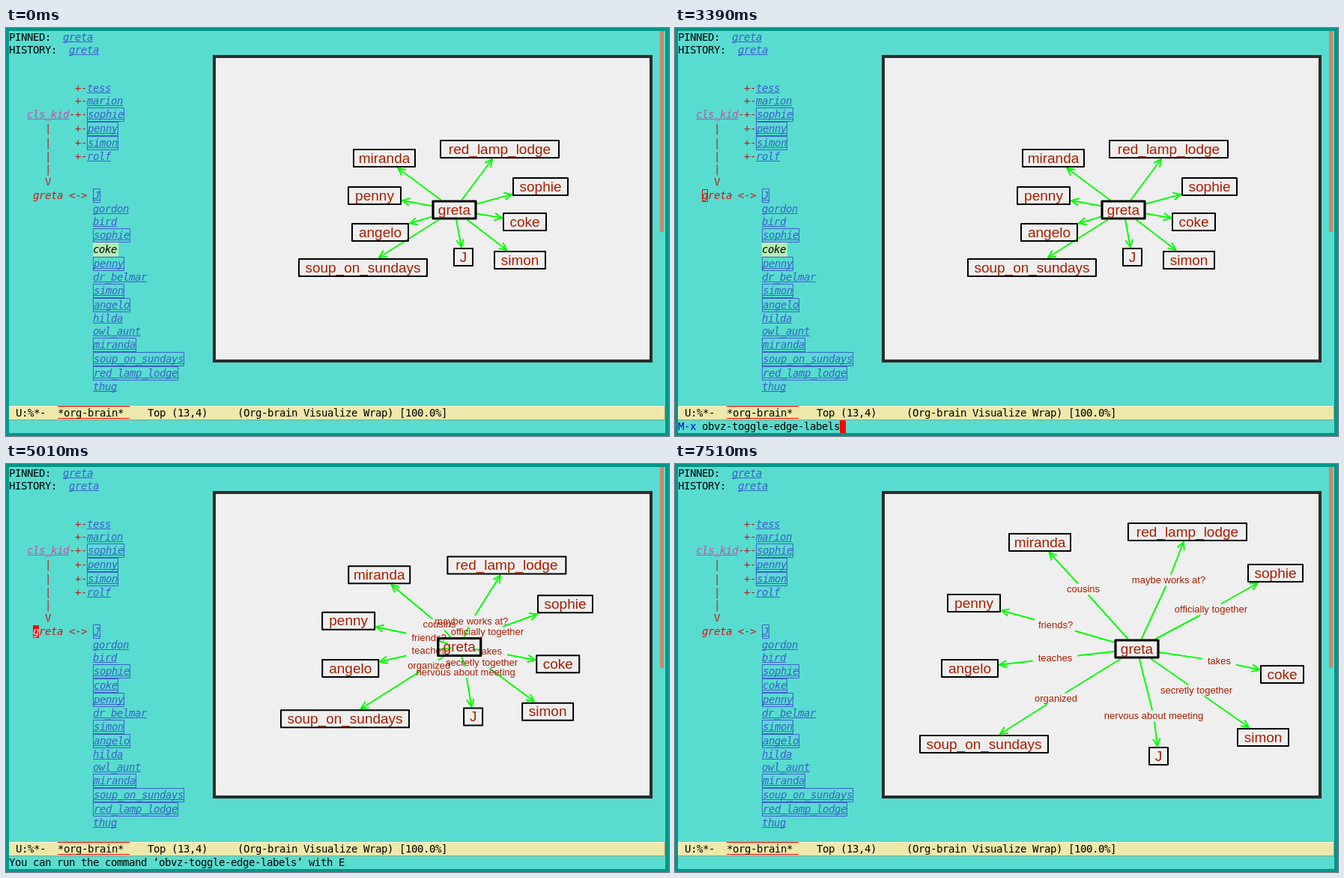
Write an HTML page with a canvas that moves like this. It is 885x544 px and loops after 7870 ms.

```html
<!DOCTYPE html>
<html lang="en">
<head>
<meta charset="utf-8">
<title>Graph edge labels</title>
<style>
  html, body { margin: 0; width: 100%; height: 100%; overflow: hidden; background: #58dccf; }
  canvas { display: block; }
</style>
</head>
<body>
<canvas id="stage" width="885" height="544"></canvas>
<script>
const ctx = document.getElementById('stage').getContext('2d');

const LOOP = 7870;
const CELL = 8, ROW = 17, ASCENT = 13;
const MONO = '14px "DejaVu Sans Mono", monospace';
const SANS = '"Liberation Sans", Arial, sans-serif';
const BG = '#58dccf', FRAME = '#009688', LINK = '#3a5fcd', TREE = '#b22222';
const RED = '#dd1010', CURSOR = '#ff0000', NODE = '#a61e00', EDGE = '#00ff00';

const COMMAND = 'obvz-toggle-edge-labels';
const MESSAGE = 'You can run the command ‘' + COMMAND + '’ with E';
const KEYS = [960, 1110, 1290, 1380, 1640, 1880, 1970, 2110, 2250, 2480, 2610, 2800, 2940, 3130];
const PROMPT = 400, COMPLETE = 3390, ENTER = 4750, RUN = 4920, CLEAR = 7000;
const STEPS = [4920, 4970, 5010, 5070, 5120, 5170];

// Sidebar entries; a leading # marks a boxed link.
const SIBLINGS = ['tess', 'marion', '#sophie', '#penny', '#simon', 'rolf'];
const CHILDREN = ['gordon', 'bird', '#sophie', '#coke', '#penny', 'dr_belmar', '#simon', '#angelo',
  'hilda', 'owl_aunt', '#miranda', '#soup_on_sundays', '#red_lamp_lodge', 'thug'];

const HUB = { name: 'greta', w: 57, from: [598.5, 242.5], to: [616.5, 246.5] };
const NODES = [
  { name: 'miranda', w: 82, from: [505, 173.5], to: [487, 104.5], label: 'cousins', at: [545, 167] },
  { name: 'red_lamp_lodge', w: 158, from: [659, 161.5], to: [684, 90.5], label: 'maybe works at?', at: [659, 155] },
  { name: 'sophie', w: 73, from: [713.5, 211.5], to: [801.5, 145.5], label: 'officially together', at: [715.5, 194] },
  { name: 'penny', w: 70, from: [492, 223.5], to: [399, 185.5], label: 'friends?', at: [508, 215] },
  { name: 'coke', w: 57, from: [692.5, 258.5], to: [810.5, 280.5], label: 'takes', at: [726.5, 263] },
  { name: 'angelo', w: 75, from: [499.5, 272.5], to: [393.5, 272.5], label: 'teaches', at: [507.5, 259] },
  { name: 'simon', w: 68, from: [686, 309.5], to: [785, 364.5], label: 'secretly together', at: [696, 302] },
  { name: 'J', w: 25, from: [610.5, 305.5], to: [645.5, 389.5], label: 'nervous about meeting', at: [639, 336] },
  { name: 'soup_on_sundays', w: 171, from: [476.5, 319.5], to: [412.5, 373.5], label: 'organized', at: [508.5, 313] }
];

function rect(x, y, w, h, color) {
  ctx.fillStyle = color;
  ctx.fillRect(x, y, w, h);
}

function outline(x, y, w, h, color) {
  ctx.strokeStyle = color;
  ctx.lineWidth = 1;
  ctx.strokeRect(x + 0.5, y + 0.5, w - 1, h - 1);
}

// Terminal text: one glyph per cell.
function cells(text, x, base, color, italic) {
  ctx.font = (italic ? 'italic ' : '') + MONO;
  ctx.textAlign = 'left';
  ctx.fillStyle = color;
  [...text].forEach((ch, i) => ctx.fillText(ch, x + i * CELL, base));
}

function link(text, x, base, color = LINK) {
  cells(text, x, base, color, true);
  rect(x, base + 1, text.length * CELL, 1, color);
}

// Draws one entry and returns the height of its line.
function entry(item, x, y, hover) {
  const boxed = item[0] === '#';
  const name = boxed ? item.slice(1) : item;
  if (!boxed) {
    link(name, x, y + ASCENT);
    return ROW;
  }
  const w = name.length * CELL + 2;
  if (hover) {
    rect(x, y, w, ROW + 2, '#b4eeb4');
    cells(name, x, y + 1 + ASCENT, '#000', true);
  } else {
    link(name, x + 1, y + 1 + ASCENT);
    outline(x, y, w, ROW + 2, LINK);
  }
  return ROW + 2;
}

function sidebar(t) {
  cells('PINNED:', 4, 17, '#000');
  link(HUB.name, 76, 17);
  cells('HISTORY:', 4, 34, '#000');
  link(HUB.name, 84, 34);

  let y = 72;
  SIBLINGS.forEach((item, i) => {
    const base = y + ASCENT + (item[0] === '#' ? 1 : 0);
    cells('+-', 92, base, TREE);
    if (i === 2) {
      link('cls_kid', 28, base, '#c050a8');
      cells('-', 84, base, TREE);
    }
    if (i > 2) cells('|', 52, base, TREE);
    y += entry(item, 108, y);
  });
  cells('|', 52, y + ASCENT, TREE);
  cells('V', 52, y + ROW + ASCENT, TREE);
  y += 2 * ROW;

  const base = y + 1 + ASCENT;
  const solid = (t >= 210 && t < PROMPT) || (t >= RUN && t < 7510);
  cells(HUB.name, 36, base, RED, true);
  if (solid) {
    rect(36, y + 1, CELL, ROW, CURSOR);
    cells(HUB.name[0], 36, base, '#f4ffff', true);
  } else if (t >= PROMPT && t < RUN) {
    outline(36, y + 1, CELL, ROW, CURSOR);
  }
  cells('<->', 84, base, TREE);
  y += entry('#J', 116, y);
  for (const item of CHILDREN) y += entry(item, 116, y, item === '#coke' && t < RUN);
}

function modeLine() {
  rect(4, 504, 876, 19, '#eee8aa');
  rect(4, 504, 876, 1, '#fffbd0');
  rect(4, 504, 1, 19, '#fffbd0');
  rect(4, 522, 876, 1, '#a19d73');
  rect(879, 504, 1, 19, '#a19d73');
  rect(69, 504, 96, 1, CURSOR);
  rect(69, 520, 96, 1, CURSOR);
  cells('U:%*-  *org-brain*    Top (13,4)     (Org-brain Visualize Wrap) [100.0%]', 13, 518, '#000');
}

function echoArea(t) {
  const base = 536;
  if (t >= RUN && t < CLEAR) cells(MESSAGE, 4, base, '#000');
  if (t < PROMPT || t >= RUN) return;
  const count = t >= COMPLETE ? COMMAND.length : KEYS.filter(k => t >= k).length;
  cells('M-x', 4, base, '#0000cd');
  cells(COMMAND.slice(0, count), 36, base, '#000');
  if (t >= ENTER) {
    rect(4, 523, CELL, ROW, CURSOR);
    cells('M', 4, base, BG);
  } else if (!(t >= 900 && t < 960) && !(t >= 3900 && t < 4390)) {
    rect(36 + count * CELL, 523, CELL, ROW, CURSOR);
  }
}

const mix = (a, b, p) => [a[0] + (b[0] - a[0]) * p, a[1] + (b[1] - a[1]) * p];

// Point where the ray from a box centre towards a target leaves the box.
function border(c, w, h, target) {
  const dx = target[0] - c[0], dy = target[1] - c[1];
  if (!dx && !dy) return c;
  const k = Math.min(w / 2 / Math.abs(dx), h / 2 / Math.abs(dy));
  return [c[0] + dx * k, c[1] + dy * k];
}

function line(points) {
  ctx.beginPath();
  points.forEach(p => ctx.lineTo(p[0], p[1]));
  ctx.stroke();
}

function arrow(a, b) {
  const angle = Math.atan2(b[1] - a[1], b[0] - a[0]);
  const barb = s => [b[0] - 11 * Math.cos(angle + s), b[1] - 11 * Math.sin(angle + s)];
  line([a, b]);
  line([barb(0.46), b, barb(-0.46)]);
}

function edge(node, hub, pos, p) {
  ctx.strokeStyle = EDGE;
  ctx.lineWidth = 2;
  const hubEnd = target => border(hub, HUB.w + 3, 26, target);
  const nodeEnd = target => border(pos, node.w + 4, 27, target);
  if (!p) {
    arrow(hubEnd(pos), nodeEnd(hub));
    return;
  }
  const mid = mix(HUB.from, node.at, p);
  ctx.font = '13px ' + SANS;
  const w = ctx.measureText(node.label).width + 14;
  line([hubEnd(mid), border(mid, w, 15, hub)]);
  arrow(border(mid, w, 15, pos), nodeEnd(mid));
}

function caption(text, [x, y], size, drop) {
  ctx.font = size + 'px ' + SANS;
  ctx.textAlign = 'center';
  ctx.fillStyle = NODE;
  ctx.fillText(text, x, y + drop);
}

function box(node, pos, weight) {
  ctx.strokeStyle = '#000';
  ctx.lineWidth = weight;
  ctx.strokeRect(pos[0] - node.w / 2, pos[1] - 11.5, node.w, 23);
  caption(node.name, pos, 19, 6);
}

function graph(t) {
  rect(276, 36, 587, 410, '#2b2b2b');
  rect(280, 40, 579, 402, '#efefef');
  const step = STEPS.filter(s => t >= s).pop();
  const p = step ? (step - 4914) / 256 : 0;
  const hub = mix(HUB.from, HUB.to, p);
  const places = NODES.map(n => mix(n.from, n.to, p));
  ctx.lineJoin = 'round';
  NODES.forEach((n, i) => edge(n, hub, places[i], p));
  if (p) NODES.forEach(n => caption(n.label, mix(HUB.from, n.at, p), 13, 4));
  NODES.forEach((n, i) => box(n, places[i], 2));
  box(HUB, hub, 3.2);
}

function draw(t) {
  rect(0, 0, 885, 544, FRAME);
  rect(4, 4, 876, 536, BG);
  rect(873, 4, 5, 268, '#cd8765');
  sidebar(t);
  graph(t);
  modeLine();
  echoArea(t);
}

const start = performance.now();
function tick() {
  draw((performance.now() - start) % LOOP);
  requestAnimationFrame(tick);
}
tick();
</script>
</body>
</html>
```
